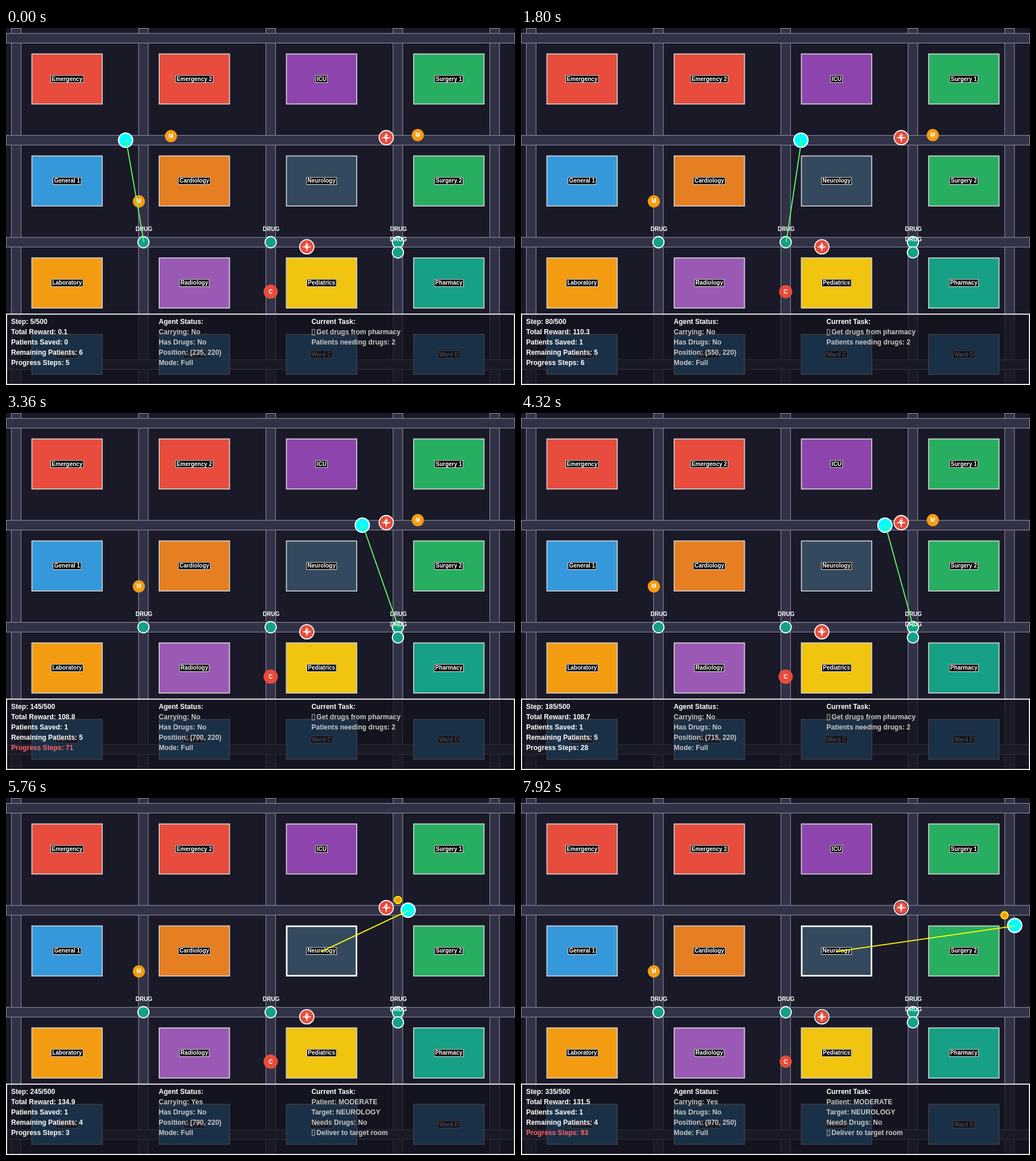
Animation of 894x626 px, one loop 8000 ms. Source, as an HTML page with a canvas:

```html
<!DOCTYPE html>
<html>
<head>
<meta charset="utf-8">
<style>
html, body { margin: 0; width: 100%; height: 100%; overflow: hidden; background: #191928; }
canvas { display: block; }
</style>
</head>
<body>
<canvas id="stage" width="894" height="626"></canvas>
<script>
const ctx = document.getElementById('stage').getContext('2d');
const FONT = '"Liberation Sans", Arial, sans-serif';
const LOOP = 8000, TICK = 120;

const ROOMS = [
  ['Emergency', '#e74c3c'], ['Emergency 2', '#e74c3c'], ['ICU', '#8e44ad'], ['Surgery 1', '#27ae60'],
  ['General 1', '#3498db'], ['Cardiology', '#e67e22'], ['Neurology', '#34495e'], ['Surgery 2', '#27ae60'],
  ['Laboratory', '#f39c12'], ['Radiology', '#9b59b6'], ['Pediatrics', '#f1c40f'], ['Pharmacy', '#16a085'],
  ['Ward A', '#3498db'], ['Ward B', '#3498db'], ['Ward C', '#3498db'], ['Ward D', '#3498db']
].map(([name, color], i) => ({
  name, color, x: 50 + 250 * (i % 4),
  y: [50, 250, 450, 600][i >> 2], h: i < 12 ? 100 : 80
}));
const DRUGS = [[270, 420], [520, 420], [770, 420], [770, 440]];
const CRITICAL = [[747, 215, true], [591, 429, true], [520, 517, false]];

// Deliveries in simulation steps
const TRIPS = [
  { pick: 18, drop: 35, x: 324, y: 212, room: 'Cardiology' },
  { pick: 242, drop: Infinity, x: 809, y: 210, room: 'Neurology' }
];
const PROGRESS = [0, 18, 35, 74, 157, 242];
const PATH_X = [[5, 235], [80, 550], [145, 700], [156, 700], [157, 715], [185, 715], [245, 790], [285, 970]];
const PATH_Y = [[290, 220], [315, 250]];
const REWARD = [[5, .1], [17, .6], [18, 26.5], [34, 26.1], [35, 110.8], [80, 110.3], [145, 108.8],
  [185, 108.7], [241, 108.9], [242, 134.9], [245, 134.9], [285, 135.3], [335, 131.5]];

function sample(keys, s) {
  const next = keys.findIndex(k => k[0] >= s);
  if (next === 0) return keys[0][1];
  if (next < 0) return keys[keys.length - 1][1];
  const [s0, a] = keys[next - 1], [s1, b] = keys[next];
  return a + (b - a) * (s - s0) / (s1 - s0);
}

const snap = (v, base) => base + 15 * Math.round((v - base) / 15);

function box(x, y, w, h, fill, stroke, width) {
  ctx.fillStyle = fill;
  ctx.fillRect(x, y, w, h);
  ctx.strokeStyle = stroke;
  ctx.lineWidth = width;
  ctx.strokeRect(x + width / 2, y + width / 2, w - width, h - width);
}

function disc(x, y, r, fill, stroke, width = 2) {
  ctx.beginPath();
  ctx.arc(x, y, r, 0, 2 * Math.PI);
  ctx.fillStyle = fill;
  ctx.fill();
  if (stroke) ring(x, y, r, stroke, width);
}

function ring(x, y, r, stroke, width = 2) {
  ctx.beginPath();
  ctx.arc(x, y, r - width / 2, 0, 2 * Math.PI);
  ctx.strokeStyle = stroke;
  ctx.lineWidth = width;
  ctx.stroke();
}

function line(x0, y0, x1, y1, color) {
  ctx.beginPath();
  ctx.moveTo(x0, y0);
  ctx.lineTo(x1, y1);
  ctx.strokeStyle = color;
  ctx.lineWidth = 2;
  ctx.stroke();
}

function text(str, x, y, size = 11.2, color = '#fff', align = 'center') {
  ctx.font = `bold ${size}px ${FONT}`;
  ctx.textAlign = align;
  ctx.textBaseline = 'middle';
  ctx.fillStyle = color;
  ctx.fillText(str, x, y + 0.5);
}

function drawMap(target) {
  ctx.fillStyle = '#191928';
  ctx.fillRect(0, 0, 1000, 701);
  for (const x of [10, 260, 510, 760, 950]) box(x, 0, 20, 700, '#323246', '#a0a0b8', 1);
  for (const y of [10, 210, 410, 650]) box(0, y, 1000, 20, '#323246', '#a0a0b8', 1);
  for (const { name, color, x, y, h } of ROOMS) {
    const chosen = name === target;
    box(x, y, 140, h, color, chosen ? '#fff' : '#c8c8c8', chosen ? 3 : 2);
    ctx.font = `bold 11.2px ${FONT}`;
    const w = ctx.measureText(name).width + 5;
    box(x + 70 - w / 2, y + h / 2 - 7.5, w, 15, '#000', '#fff', 1);
    text(name, x + 70, y + h / 2);
  }
}

function drawPatients(step, frame) {
  const mild = [[261, 340], ...TRIPS.filter(t => step < t.pick).map(t => [t.x, t.y])];
  for (const [x, y] of mild) {
    disc(x, y, 12, '#f39c12');
    text('M', x, y);
  }
  const pulse = 13 + Math.cos(frame * Math.PI / 2);
  for (const [x, y, needsDrugs] of CRITICAL) {
    disc(x, y, pulse, '#e74c3c');
    text('C', x, y);
    if (!needsDrugs) continue;
    ring(x, y, 15, '#fff');
    line(x - 8, y, x + 8, y, '#fff');
    line(x, y - 8, x, y + 8, '#fff');
  }
}

function drawPanel(step, x, y, trip) {
  box(0, 560, 1000, 140, 'rgba(20,20,30,0.784)', '#fff', 2);
  const since = step - Math.max(...PROGRESS.filter(p => p <= step));
  const saved = TRIPS.filter(t => t.drop <= step).length;
  const waiting = 6 - TRIPS.filter(t => t.pick <= step).length;
  const rows = (left, lines, color) => lines.forEach((str, i) => {
    const rowY = 576.5 + 20 * i;
    const icon = str[0] === '*';
    if (icon) {
      ctx.strokeStyle = color;
      ctx.lineWidth = 1;
      ctx.strokeRect(left + 1.5, rowY - 5.5, 5, 11);
    }
    text(icon ? str.slice(1) : str, left + (icon ? 10 : 0), rowY, 13.5, i ? color : '#fff', 'left');
  });
  rows(10, [`Step: ${step}/500`, `Total Reward: ${sample(REWARD, step).toFixed(1)}`,
    `Patients Saved: ${saved}`, `Remaining Patients: ${waiting}`], '#fff');
  text(`Progress Steps: ${since}`, 10, 656.5, 13.5, since > 30 ? '#ff6464' : '#fff', 'left');
  rows(300, ['Agent Status:', `Carrying: ${trip ? 'Yes' : 'No'}`, 'Has Drugs: No',
    `Position: (${x}, ${y})`, 'Mode: Full'], '#c8c8c8');
  rows(600, trip
    ? ['Current Task:', 'Patient: MODERATE', `Target: ${trip.room.toUpperCase()}`,
      'Needs Drugs: No', '*Deliver to target room']
    : ['Current Task:', '*Get drugs from pharmacy', 'Patients needing drugs: 2'], '#c8c8c8');
}

function draw(frame) {
  const step = 5 + 5 * frame;
  const x = snap(sample(PATH_X, step), 235);
  const y = snap(sample(PATH_Y, step), 220);
  const trip = TRIPS.find(t => step >= t.pick && step < t.drop);

  ctx.setTransform(0.894, 0, 0, 626 / 700, 0, 0);
  drawMap(trip && trip.room);
  for (const [dx, dy] of DRUGS) {
    disc(dx, dy, 12, '#16a085', '#fff');
    text('DRUG', dx + 1, dy - 25);
  }
  drawPatients(step, frame);
  disc(x, y, 15, '#0ff', '#fff', 2.5);
  if (trip) {
    disc(x - 20, y - 20, 8, '#f39c12', '#ff0');
    const room = ROOMS.find(r => r.name === trip.room);
    line(x, y + 1, room.x + 70, room.y + 51, '#ff0');
  } else {
    const distance = d => Math.hypot(d[0] - x, d[1] - y);
    const near = DRUGS.reduce((a, b) => distance(b) < distance(a) ? b : a);
    line(x + 1, y, near[0] + 1, near[1], '#64ff64');
  }
  drawPanel(step, x, y, trip);
}

const start = performance.now();
function tick() {
  draw(Math.floor((performance.now() - start) % LOOP / TICK));
  requestAnimationFrame(tick);
}
tick();
</script>
</body>
</html>
```
